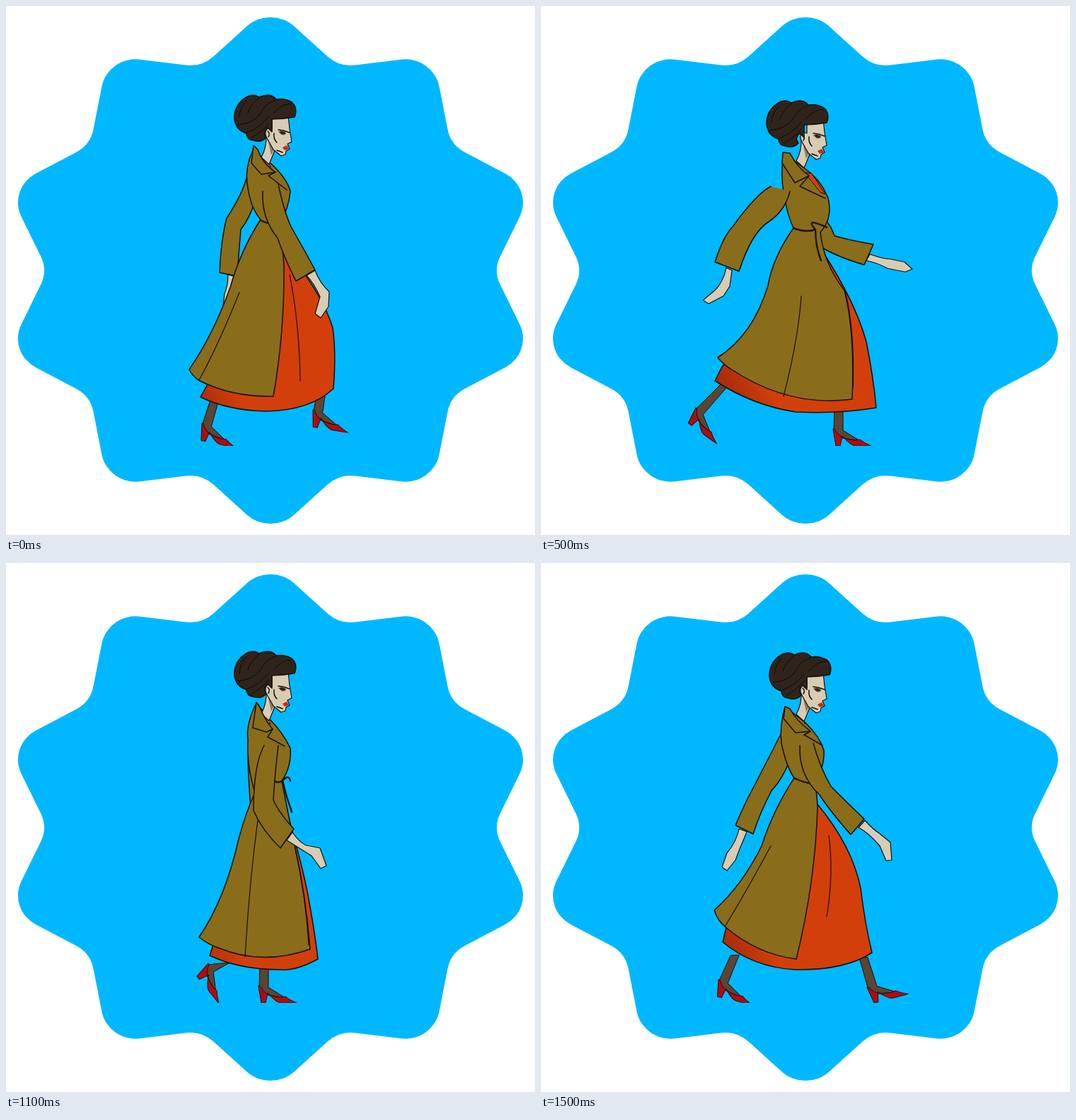
These frames come from a looping animation (748x748 px, 1600 ms). An HTML page with a canvas:

```html
<!DOCTYPE html>
<html>
<head>
<meta charset="utf-8">
<style>
html, body { margin: 0; width: 748px; height: 748px; overflow: hidden; background: #fff; }
canvas { display: block; }
</style>
</head>
<body>
<canvas id="stage" width="748" height="748"></canvas>
<script>
const ctx = document.getElementById('stage').getContext('2d');
const INK = '#14100a', COAT = '#8a6d1b', SKIN = '#d8ccb4', RED = '#d33f0b';
const STEP = 100, STEPS = 16;

// Key poses of the walk; every track below has one entry per key.
const KEYS = [0, 3, 5, 7, 9, 11, 13, 15];

const TRACKS = {
  // head y, hair x, hair y
  head: ['0 0 0', '0 -3 4', '5 -4 3', '1 -2 1', '-2 0 0', '-1 0 0', '5 -1 0', '0 0 1'],
  // heel x, heel y, angle, calf x, calf y
  nearLeg: ['277 590 12 294 560', '356 598 0 365 570', '413 598 0 421 570', '461 600 -15 456 558',
    '413 566 20 429 543', '286 566 51 309 566', '216 568 39 252 542', '251 589 13 274 555'],
  farLeg: ['434 571 9 446 546', '293 563 50 309 566', '219 568 36 262 533', '251 589 13 274 555',
    '298 591 12 312 565', '357 598 0 365 570', '453 599 0 456 552', '461 600 -15 456 558'],
  coat: [
    'M349 204Q338 228 341 250Q345 285 360 302Q332 345 317 398Q293 465 259 514Q264 524 274 530Q320 553 378 552Q394 462 393 366Q390 335 388 306Q400 285 402 262Q398 245 376 224Z',
    'M352 204Q338 235 340 262Q342 310 337 352Q333 385 318 425Q301 490 273 528Q285 537 300 543Q360 572 416 556Q418 470 405 385Q393 340 390 307Q400 290 404 266Q392 240 372 220Z',
    'M343 208Q338 240 344 268Q348 295 357 314Q328 355 321 395Q300 465 250 497Q258 507 268 513Q350 568 440 556Q444 460 429 402Q400 365 395 320Q413 300 406 272Q397 248 376 232Z',
    'M348 203Q338 232 341 258Q347 290 357 306Q331 350 325 395Q306 470 262 515Q275 525 290 530Q370 560 447 540Q446 450 428 392Q405 350 394 312Q408 292 403 266Q392 243 374 226Z',
    'M354 197Q336 228 336 258Q345 290 358 302Q335 340 332 385Q320 470 291 543Q320 545 340 541Q400 537 447 513Q444 435 427 382Q412 345 394 306Q406 285 402 260Q390 238 373 222Z',
    'M354 198Q339 228 342 250Q340 285 352 325Q340 350 329 390Q310 475 273 529Q285 539 300 544Q362 570 430 546Q424 470 408 398Q398 350 390 308Q404 288 402 262Q392 240 372 220Z',
    'M345 208Q337 240 341 265Q347 295 358 312Q325 365 306 405Q278 455 242 487Q245 500 258 512Q300 545 351 554Q383 455 391 350Q388 330 385 314Q400 295 400 272Q393 250 374 232Z',
    'M345 203Q337 232 340 255Q347 288 358 304Q328 350 312 400Q285 455 245 491Q250 506 260 514Q305 553 361 560Q388 450 391 345Q390 325 387 308Q401 290 400 265Q394 245 374 226Z'],
  skirt: [
    'M390 340Q445 400 462 455Q467 490 463 541Q430 572 368 573Q315 572 275 553L285 535Z',
    'M395 345Q418 430 428 480Q434 520 437 564Q405 572 368 574Q320 572 284 558L290 540Z',
    'M400 350Q445 420 460 475Q470 525 474 568Q420 577 360 574Q300 565 246 530L256 510Z',
    'M400 345Q446 410 463 460Q470 510 470 552Q420 576 350 574Q300 570 265 545L275 520Z',
    'M405 345Q460 415 478 452Q480 480 470 525Q410 567 340 570Q315 571 297 566L302 540Z',
    'M395 345Q420 430 428 475Q437 525 441 560Q410 577 388 575Q330 575 288 555L293 540Z',
    'M390 340Q450 410 462 465Q470 510 482 537Q430 570 370 574Q300 570 239 532L250 510Z',
    'M390 340Q440 400 452 460Q458 510 468 551Q430 576 360 575Q300 572 257 536L262 515Z'],
  // coat panel, then skirt fold
  seams: [
    'M330 405Q300 480 273 529M401 380Q415 450 416 530', 'M350 410Q346 480 331 557M405 385Q418 470 416 530',
    'M368 410Q364 470 343 552M430 402Q444 460 441 540', 'M368 385Q362 460 357 545M428 392Q446 450 447 535',
    'M366 340Q358 440 371 538M428 385Q444 440 446 510', 'M358 350Q345 440 338 557M408 400Q424 470 428 540',
    'M325 400Q295 460 250 505M408 385Q415 440 405 520', 'M325 400Q290 465 260 514M407 385Q414 440 404 500'],
  belt: [
    'M360 303Q369 308 380 308Q385 310 386 312M380 308Q381 306 382 305',
    'M366 306Q378 312 390 309Q388 335 378 355M390 309Q402 296 402 308',
    'M357 314Q375 321 388 316Q388 340 396 360M388 316Q372 298 404 313',
    'M357 306Q375 314 391 311Q392 330 402 345M391 311Q385 297 404 306',
    'M358 301Q375 311 393 306Q398 325 410 337M393 306Q396 294 404 311',
    'M378 308Q385 312 391 308Q396 330 404 352M391 308Q400 298 402 308',
    'M358 311Q370 317 383 318Q386 320 387 321M383 318Q384 317 385 316',
    'M358 304Q370 310 386 313Q387 315 388 316M386 313Q387 312 388 311'],
  blouse: [
    'M373 226L374 227L374 228L373 227Z', 'M373 226L374 227L374 228L373 227Z',
    'M372 235L383 237L402 266L396 264Z', 'M373 230L377 231L387 244L384 243Z',
    'M373 229L376 229L381 235L378 235Z', 'M373 226L374 227L374 228L373 227Z',
    'M373 230L374 231L374 232L373 231Z', 'M373 226L374 227L374 228L373 227Z'],
  collar: [
    'M350 197L347 222L361 238L381 235Q362 222 356 203Z', 'M355 197L350 233L369 240L377 235Q366 222 359 202Z',
    'M342 207L341 222L359 250L379 240Q362 228 352 208Z', 'M348 202L346 226L364 244L378 237Q363 224 354 204Z',
    'M354 196L349 233L369 241L376 234Q366 222 358 200Z', 'M354 197L349 233L368 239L377 235Q366 222 358 202Z',
    'M345 207L344 222L362 246L381 240Q360 226 351 211Z', 'M345 203L343 220L360 240L381 238Q360 222 352 206Z'],
  lapel: [
    'M381 235L371 240L397 260', 'M377 235L369 247L395 259', 'M379 240L366 255L402 272', 'M378 237L369 250L400 263',
    'M376 234L370 247L398 257', 'M377 235L370 246L394 259', 'M381 240L372 246L398 264', 'M381 238L372 243L398 258'],
  nearSleeve: [
    'M385 252Q393 290 403 312Q420 342 437 373L410 389Q393 355 384 328Q361 300 363 262',
    'M367 256Q371 290 369 315Q365 360 371 404L338 411Q336 360 336 325Q334 275 345 262',
    'M352 262Q345 290 322 305Q298 320 280 375L246 362Q258 325 271 312Q305 265 325 255',
    'M355 256Q350 290 332 308Q318 330 304 382L275 370Q285 335 293 318Q318 275 332 258',
    'M366 250Q364 292 346 312Q332 335 339 382L310 381Q307 345 308 321Q332 285 337 262',
    'M385 258Q380 300 378 335Q385 352 407 376L388 403Q362 378 350 350Q350 285 365 258',
    'M385 252Q394 290 408 324Q430 338 455 350L441 378Q405 356 388 330Q362 300 364 258',
    'M385 255Q395 290 410 316Q432 338 457 362L438 384Q408 350 394 328Q364 300 366 258'],
  nearHand: [
    'M437 374Q444 392 457 404L456 425L445 441L437 435L444 411Q436 393 425 381Z',
    'M368 406Q362 420 367 432L360 450L343 458L335 455L350 440Q358 425 359 407Z',
    'M270 374Q268 388 267 396L258 410L237 421L229 416L246 402Q258 390 262 370Z',
    'M298 380Q294 393 292 402L283 418L262 434L256 430L268 408Q280 392 286 376Z',
    'M326 384Q325 398 329 405L344 420L340 444L332 440L330 428Q318 405 315 383Z',
    'M405 381Q415 395 424 399L444 403L453 428L445 432L432 414Q413 402 397 392Z',
    'M453 354Q468 362 478 365L507 363L521 384L513 380L496 378Q473 372 448 366Z',
    'M458 364Q470 377 478 382L494 395L496 420L488 421L479 400Q464 382 449 374Z'],
  farSleeve: [
    'M352 275Q345 300 332 316Q329 350 327 382L302 377Q304 330 312 300Q335 265 341 240',
    'M375 290Q388 330 397 345Q405 352 413 360L401 374Q390 360 380 340Q365 310 365 280',
    'M400 300Q410 310 415 325Q440 332 470 337L457 366Q420 355 398 342Q385 320 385 300',
    'M398 290Q403 305 412 318Q432 335 455 355L440 378Q412 356 396 335Q385 315 385 295',
    'M372 270Q375 300 372 330Q376 350 385 370L368 378Q358 350 352 330Q352 300 352 270',
    'M362 265Q362 295 360 320Q360 345 360 365L348 365Q345 340 344 318Q341 280 343 245',
    'M352 275Q335 300 314 320Q300 350 293 380L264 372Q278 340 288 315Q315 262 340 240',
    'M352 278Q342 305 326 322Q310 352 300 383L275 371Q288 340 300 318Q325 270 341 238'],
  farHand: [
    'M322 382Q320 395 321 402L318 415L312 426L307 424L309 407Q314 395 314 380Z',
    'M404 371Q418 382 426 384L443 391L452 404L446 407L425 400Q412 386 402 378Z',
    'M465 351Q485 358 495 358L514 362L525 372L515 376L490 371Q475 363 460 360Z',
    'M453 360Q466 373 474 378L490 392L493 414L485 416L474 398Q460 380 446 372Z',
    'M385 372Q383 385 384 395L380 405L375 415L370 410L372 395Q372 385 372 373Z',
    'M360 364Q358 375 358 385L356 395L354 405L350 402L350 390Q350 375 350 364Z',
    'M286 378Q278 395 277 404L268 421L252 430L247 425L259 405Q272 395 276 376Z',
    'M291 380Q285 395 281 404L275 420L263 435L256 430L263 410Q276 395 280 376Z']
};

const NUMBER = /-?\d+/g;
const mix = (a, b, k) => {
  const ends = b.match(NUMBER);
  let i = 0;
  return a.replace(NUMBER, n => (+n + (ends[i++] - n) * k).toFixed(1));
};

function poseAt(step) {
  const i = KEYS.findLastIndex(key => key <= step), j = (i + 1) % KEYS.length;
  const k = (step - KEYS[i]) / ((KEYS[j] || STEPS) - KEYS[i]);
  const pose = {};
  for (const name in TRACKS) pose[name] = mix(TRACKS[name][i], TRACKS[name][j], k);
  return pose;
}

function shape(d, fill, stroke = INK, width = 1.5) {
  const path = new Path2D(d);
  if (fill) { ctx.fillStyle = fill; ctx.fill(path); }
  if (stroke) { ctx.strokeStyle = stroke; ctx.lineWidth = width; ctx.stroke(path); }
}

function drawBadge() {
  const corner = i => {
    const a = i * Math.PI / 10, r = i % 2 ? 302.4 : 375.6;
    return [r * Math.sin(a), -r * Math.cos(a)];
  };
  const [x0, y0] = corner(0), [x1, y1] = corner(1);
  ctx.save();
  ctx.translate(374, 374);
  ctx.scale(1.0415, 1);
  ctx.beginPath();
  ctx.moveTo((x0 + x1) / 2, (y0 + y1) / 2);
  for (let i = 1; i <= 20; i++) ctx.arcTo(...corner(i), ...corner(i + 1), 47);
  ctx.closePath();
  ctx.fillStyle = '#00b8ff';
  ctx.fill();
  ctx.restore();
}

function drawLeg(track) {
  const [x, y, angle, calfX, calfY] = track.split(' ').map(Number);
  const a = angle * Math.PI / 180, cos = Math.cos(a), sin = Math.sin(a);
  const at = (u, v) => `${x + u * cos - v * sin} ${y + u * sin + v * cos}`;
  shape(`M${calfX - 6} ${calfY}L${at(1, 2)}L${at(8, 12)}L${at(38, 17)}L${at(14, 2)}L${calfX + 6} ${calfY}Z`, '#5b4534', INK, 1);
  ctx.save();
  ctx.translate(x, y);
  ctx.rotate(a);
  shape('M0 0L4 24L10 24L13 10Q25 24 32 24L54 24Q44 20 38 15Q26 18 12 11Q6 8 2 0Z', '#ad0d12', '#3a0505', 1);
  ctx.restore();
}

function drawHead(track) {
  const [y, hairX, hairY] = track.split(' ').map(Number);
  ctx.save();
  ctx.translate(0, y);
  shape('M376 157L399 155L401 174L404 192L398 195L401 202L396 205L395 210L389 212L378 203L369 187Q364 178 370 173L376 175Z', SKIN, INK, 1.2);
  shape('M385 175L392 176L401 179M379 180Q378 188 383 193M370 177Q374 180 371 185M383 204L391 207');
  shape('M386 178Q391 174 396 180Q391 185 386 178Z', '#302419', '#6d5d49', 1);
  shape('M391 200L397 197L400 202L394 204Z', '#c02c18', null);
  ctx.translate(hairX, hairY);
  shape('M376 178L376 160Q392 160 408 157Q413 144 404 136Q394 130 382 132Q374 122 358 129Q348 122 335 132Q322 143 323 160Q325 176 340 180Q340 189 350 190Q360 194 368 186Q362 178 370 172Z', '#30241a');
  shape('M358 130Q345 140 342 152M381 133Q366 138 360 152Q350 166 328 168M404 138Q390 138 378 152M372 156Q360 172 341 179M340 134Q330 145 330 157M372 166Q360 180 347 186', null, '#0d0906', 1);
  ctx.restore();
}

const skirtFill = ctx.createLinearGradient(240, 570, 320, 530);
skirtFill.addColorStop(0, '#8f220a');
skirtFill.addColorStop(1, RED);

function draw(step) {
  const pose = poseAt(step);
  const headY = parseFloat(pose.head);
  ctx.clearRect(0, 0, 748, 748);
  drawBadge();
  ctx.save();
  ctx.beginPath();
  ctx.rect(0, 0, 748, 622);
  ctx.clip();
  ctx.lineJoin = ctx.lineCap = 'round';
  drawLeg(pose.farLeg);
  drawLeg(pose.nearLeg);
  shape(pose.farHand, SKIN, INK, 1.2);
  shape(pose.farSleeve, COAT);
  shape(pose.skirt, skirtFill);
  shape(pose.coat, COAT);
  shape(pose.seams, null, INK, 1.2);
  shape(pose.blouse, RED, INK, 1);
  shape(pose.belt, null, '#24150c', 2.5);
  shape(`M368 ${180 + headY}Q369 ${200 + headY} 361 ${214 + headY}L372 ${224 + headY}Q377 ${212 + headY} 380 ${204 + headY}Z`, SKIN, INK, 1.2);
  shape(`M370 ${188 + headY}L379 ${203 + headY}L375 ${211 + headY}Z`, '#8d7b62', null);
  shape(pose.collar, COAT);
  shape(pose.lapel);
  shape(pose.nearHand, SKIN, INK, 1.2);
  shape(pose.nearSleeve, COAT);
  drawHead(pose.head);
  ctx.restore();
}

const start = performance.now();
function tick() {
  draw(Math.floor((performance.now() - start) / STEP) % STEPS);
  requestAnimationFrame(tick);
}
tick();
</script>
</body>
</html>
```
